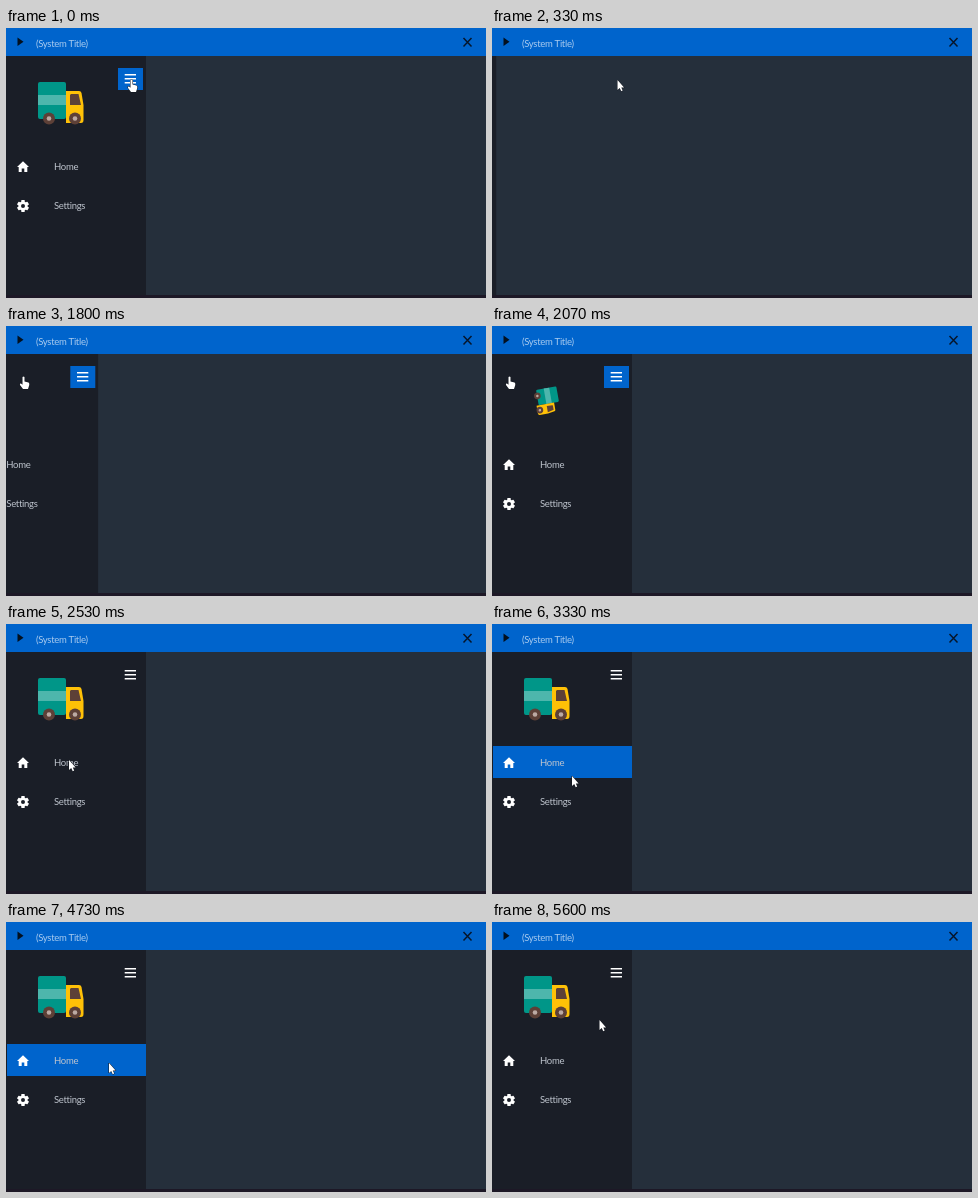
Write an HTML page with a canvas that moves like this. It is 480 px wide and 270 px high and loops after 5670 ms.

```html
<!DOCTYPE html>
<html lang="en">
<head>
<meta charset="utf-8">
<title>Sliding sidebar</title>
<style>
html, body { margin: 0; height: 100%; overflow: hidden; background: #252f3b; }
canvas { display: block; }
</style>
</head>
<body>
<canvas id="stage" width="480" height="270"></canvas>
<script>
const ctx = document.getElementById('stage').getContext('2d');
const LOOP = 5670, STEP = 200 / 3;
const BLUE = '#0064cc', DARK = '#1a1e27', MAIN = '#252f3b';
const OPEN = 140, CLOSED = 32;

// Pointer tip: time, x, y
const pointerPath = [
  [0, 125.5, 52], [400, 125.5, 52], [600, 95, 57], [667, 93, 57],
  [1000, 32, 57], [1200, 17.5, 51], [2200, 17.5, 51],
  [2533, 63, 136], [2800, 67, 161], [3000, 77, 152], [3267, 77, 152],
  [3333, 80, 152], [3867, 86, 181], [4267, 86, 181], [4333, 87, 178],
  [4733, 103, 141], [5333, 103, 141], [5600, 107.5, 98]
];

const within = (t, a, b) => t >= a && t < b;
const progress = (t, a, b) => Math.min(1, Math.max(0, (t - a) / (b - a)));

function rect(color, x, y, w, h, r = 0) {
  ctx.fillStyle = color;
  ctx.beginPath();
  ctx.roundRect(x, y, w, h, r);
  ctx.fill();
}

function disc(color, x, y, r) {
  ctx.fillStyle = color;
  ctx.beginPath();
  ctx.arc(x, y, r, 0, 7);
  ctx.fill();
}

function shape(color, d, x = 0, y = 0, outline) {
  const path = new Path2D(d);
  ctx.save();
  ctx.translate(x, y);
  if (outline) {
    ctx.strokeStyle = outline;
    ctx.lineWidth = 1;
    ctx.stroke(path);
  }
  ctx.fillStyle = color;
  ctx.fill(path);
  ctx.restore();
}

function label(text, x, y, color) {
  ctx.font = '9.5px Lato, sans-serif';
  ctx.letterSpacing = '-0.3px';
  ctx.fillStyle = color;
  ctx.fillText(text, x, y);
}

function header() {
  rect(BLUE, 0, 0, 480, 28);
  shape('#03101f', 'M11.5 9.5L17.5 13.8L11.5 18Z');
  label('(System Title)', 30, 18.5, '#a8cbef');
  ctx.strokeStyle = '#06162b';
  ctx.lineWidth = 1.5;
  ctx.stroke(new Path2D('M457.5 10L465.5 18.5M465.5 10L457.5 18.5'));
}

function truck(scale) {
  ctx.save();
  ctx.translate(55, 75);
  ctx.rotate((1 - scale) * Math.PI);
  ctx.scale(scale, scale);
  ctx.translate(-55, -75);
  rect('#009688', 32, 54, 28, 37, 2);
  rect('#4db6ac', 32, 67, 28, 10);
  shape('#ffc107', 'M60 63H73Q75 63 75.5 65L77.5 77V92Q77.5 95 75 95H60Z');
  shape('#5d4037', 'M65 66H72.5L75 77H64V67Z');
  for (const x of [43, 69]) {
    disc('#5d4037', x, 90.5, 6);
    disc('#bcaaa4', x, 90.5, 2.3);
  }
  ctx.restore();
}

function gear(x, y) {
  for (let i = 0; i < 6; i++) {
    ctx.save();
    ctx.translate(x, y);
    ctx.rotate(i * Math.PI / 3);
    rect('#fff', -1.7, -6, 3.4, 3, 0.5);
    ctx.restore();
  }
  ctx.strokeStyle = '#fff';
  ctx.lineWidth = 2.6;
  ctx.beginPath();
  ctx.arc(x, y, 3.3, 0, 7);
  ctx.stroke();
}

function sidebar(width, shown, state) {
  ctx.save();
  ctx.beginPath();
  ctx.rect(0, 28, width * shown, 239);
  ctx.clip();
  ctx.translate(width * (shown - 1), 0);
  rect(DARK, 0, 28, width, 239);
  if (state.home) rect(BLUE, 1, 122, 139, 32);
  if (state.settings) rect(BLUE, 1, 161, 139, 32);
  shape('#fff', 'M17 133.2L23 139H21.3V144H18.3V140.5H15.7V144H12.7V139H11Z');
  gear(17, 178);
  if (width === OPEN) {
    label('Home', 48, 142, '#bfc5ce');
    label('Settings', 48, 181, '#bfc5ce');
  }
  if (state.menu) rect(BLUE, width - 28, 40, 25, 22);
  for (const y of [46, 50, 54]) rect('#fff', width - 21.3, y, 11.3, 1.5);
  if (state.logo > 0) truck(state.logo);
  ctx.restore();
}

function pointer(t, hand) {
  let i = pointerPath.findIndex(p => p[0] > t);
  if (i < 0) i = pointerPath.length - 1;
  const [t0, x0, y0] = pointerPath[i - 1], [t1, x1, y1] = pointerPath[i];
  const k = progress(t, t0, t1);
  const d = hand
    ? 'M-1 0Q0-1 1 0V4.5L5 5.6Q6 6 5.8 8L4.5 12H-.5L-3.5 8Q-4 6-2.5 6.5L-1 7.7Z'
    : 'M0 0V10L2.2 8L3.7 11.2L5.2 10.5L3.8 7.5H6.6Z';
  shape('#fff', d, x0 + (x1 - x0) * k, y0 + (y1 - y0) * k, '#10141c');
}

function draw(t) {
  rect(MAIN, 0, 0, 480, 270);
  header();
  const closed = within(t, 300, 1620);
  const shown = t < 300 ? 1 : closed ? progress(t, 300, 540) : progress(t, 1620, 1893);
  sidebar(closed ? CLOSED : OPEN, shown, {
    menu: t < 300 || within(t, 1265, 2265),
    home: within(t, 2595, 3530) || within(t, 4530, 5460),
    settings: within(t, 3595, 4530),
    logo: t < 300 ? 1 - progress(t, 40, 300) : progress(t, 1900, 2200)
  });
  rect('#1d1826', 0, 267, 480, 3);
  pointer(t, t < 300 || within(t, 1265, 2200));
}

function tick() {
  const t = performance.now() % LOOP;
  draw(Math.floor((t + 4) / STEP) * STEP);
  requestAnimationFrame(tick);
}
tick();
</script>
</body>
</html>
```
